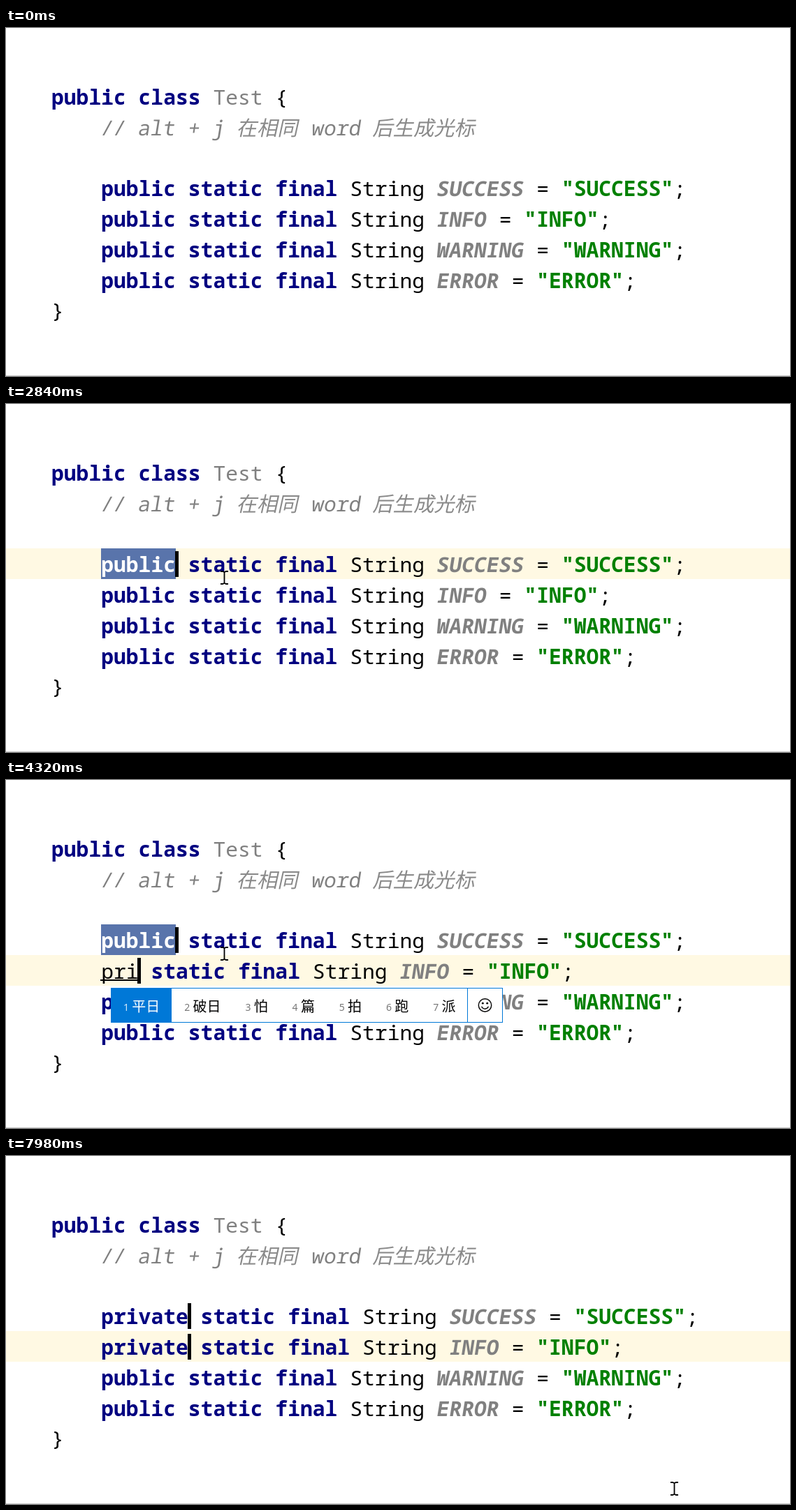
An HTML page with a canvas that plays this animation: 1122 px wide and 499 px high, repeating every 8000 ms.

```html
<!DOCTYPE html>
<html lang="zh">
<head>
<meta charset="utf-8">
<title>Multiple carets</title>
<style>
  html, body { margin: 0; width: 100%; height: 100%; overflow: hidden; background: #fff; }
  canvas { display: block; }
</style>
</head>
<body>
<canvas id="stage" width="1122" height="499"></canvas>
<script>
const ctx = document.getElementById('stage').getContext('2d');
const LOOP = 8000;
const SIZE = 29.67, CHAR = SIZE * 0.6, LEFT = 65, INDENT = LEFT + 4 * CHAR;
const HAN_SIZE = 29.3;
const MONO = '"Noto Sans Mono", "DejaVu Sans Mono", monospace';
const CJK = '"Noto Sans CJK SC", "Noto Sans CJK", sans-serif';
const THIN_CJK = '"Noto Sans CJK SC Light", ' + CJK;
const BLUE = '#0078d7';
const SLANT = 0.16;

// weight, colour, slant
const STYLES = {
  keyword: [600, '#000080', 0],
  plain: [400, '#000000', 0],
  gray: [400, '#808080', 0],
  comment: [400, '#808080', SLANT],
  field: [600, '#808080', SLANT],
  string: [600, '#008000', 0],
  selected: [600, '#ffffff', 0],
  composing: [400, '#ffffff', 0]
};

const FIELDS = ['SUCCESS', 'INFO', 'WARNING', 'ERROR'];

// Times at which the second line's word grows
const TYPING = [[2990, 'public'], [4000, 'p'], [4170, 'pr'], [4240, 'pri'],
  [4390, 'priv'], [4470, 'priva'], [4640, 'privat'], [4710, 'private']];

const CANDIDATES = [
  [4000, '怕 篇 拍 跑 派 平 盘'],
  [4170, '旁人 怕人 骗人 怕 篇 拍 跑'],
  [4320, '平日 破日 怕 篇 拍 跑 派'],
  [4470, 'private 平日 破日 怕 篇 拍 跑']
];

const CARET_ON = [[1380, 2380], [2840, 3850], [4000, 6350], [6900, 7360], [7910, LOOP]];
const POINTER_ON = [[70, 5030], [7130, LOOP]];

// start, end, steps, from, to, easing power
const GLIDES = [
  [70, 830, 11, [1105, 489], [168, 231], 2],
  [910, 910, 1, [152, 228], [152, 228], 1],
  [1140, 1210, 2, [174, 226], [196, 225], 1],
  [1530, 1750, 4, [225, 231], [312, 249], 1],
  [7130, 7360, 4, [420, 318], [906, 488], 1.4],
  [7910, 7980, 2, [934, 482], [956, 477], 1]
];

const within = (t, spans) => spans.some(([a, b]) => t >= a && t < b);
const latest = (t, list) => list.filter(item => t >= item[0]).pop();
const rowTop = row => Math.round(76 + 43.75 * row);
const baseline = row => rowTop(row) + 34;

function box(x, y, w, h, color) {
  ctx.fillStyle = color;
  ctx.fillRect(x, y, w, h);
}

// Slanted text leans about the middle of its letters
function write(text, x, y, font, color, slant = 0) {
  ctx.save();
  ctx.transform(1, 0, -slant, 1, x - slant * 11, y);
  ctx.font = font;
  ctx.fillStyle = color;
  ctx.fillText(text, 0, 0);
  ctx.restore();
}

function code(row, x, parts) {
  for (const [text, style] of parts) {
    const [weight, color, slant] = STYLES[style];
    write(text, x, baseline(row), `${weight} ${SIZE}px ${MONO}`, color, slant);
    x += text.length * CHAR;
  }
  return x;
}

function han(row, x, text) {
  write(text, x, baseline(row), `300 ${HAN_SIZE}px ${THIN_CJK}`, '#8a8a8a', 0.22);
  return x + text.length * HAN_SIZE;
}

function comment() {
  let x = code(1, INDENT, [['// alt + j ', 'comment']]);
  x = han(1, x, '在相同');
  x = code(1, x, [[' word ', 'comment']]);
  han(1, x, '后生成光标');
}

function declaration(row, word, style, name) {
  code(row, INDENT, [
    [word, style], [' static final ', 'keyword'], ['String ', 'plain'],
    [name, 'field'], [' = ', 'plain'], [`"${name}"`, 'string'], [';', 'plain']
  ]);
}

function select(row, length) {
  box(136, rowTop(row), Math.round(length * CHAR), 44, '#5974ab');
}

function caret(row, col) {
  box(Math.round(INDENT + col * CHAR - 1.2), rowTop(row) + 4, 5, 37, '#000');
}

function squiggle(x, y) {
  ctx.beginPath();
  for (let i = 0; i <= 6; i++) ctx.lineTo(x + i * 3, y + (i % 2 ? 0 : 4));
  ctx.strokeStyle = '#ff0000';
  ctx.lineWidth = 1.4;
  ctx.stroke();
}

function smiley(x, y) {
  ctx.strokeStyle = '#000';
  ctx.lineWidth = 1.4;
  ctx.beginPath();
  ctx.arc(x, y, 9.2, 0, Math.PI * 2);
  ctx.stroke();
  ctx.beginPath();
  ctx.arc(x, y, 5.2, 0.35, Math.PI - 0.35);
  ctx.stroke();
  for (const dx of [-3.2, 3.2]) {
    ctx.beginPath();
    ctx.arc(x + dx, y - 2.8, 1.4, 0, Math.PI * 2);
    ctx.fillStyle = '#000';
    ctx.fill();
  }
}

function popup(words) {
  const font = `400 20px "Noto Sans", ${CJK}`;
  const top = 298, height = 50;
  ctx.font = font;
  const widths = words.map(word => ctx.measureText(word).width + 47.2);
  const split = Math.round(150 + widths.reduce((a, b) => a + b, 0));
  box(150, top, split - 150 + 51, height, '#fff');
  box(150, top, Math.round(widths[0]), height, BLUE);
  let x = 150;
  words.forEach((word, i) => {
    write(i + 1, x + 18, 331, '400 14px "Noto Sans", sans-serif', i ? '#777' : '#d5e8f8');
    write(word, x + 30.3, 332, font, i ? '#000' : '#fff');
    x += widths[i];
  });
  ctx.strokeStyle = BLUE;
  ctx.lineWidth = 1;
  ctx.strokeRect(150.5, top + 0.5, split - 150 + 50, height - 1);
  box(split, top, 1, height, BLUE);
  smiley(split + 25.5, 323);
}

function pointer(t) {
  const [start, end, steps, from, to, power] = latest(t, GLIDES);
  const span = (end - start) / (steps - 1);
  const step = steps > 1 ? Math.min(steps - 1, Math.floor((t - start) / span + 0.05)) : 0;
  const p = steps > 1 ? 1 - (1 - step / (steps - 1)) ** power : 1;
  const [x, y] = from.map((v, i) => Math.round(v + (to[i] - v) * p));
  ctx.beginPath();
  for (const s of [-1, 1]) {
    ctx.moveTo(x - 5, y + s * 9);
    ctx.lineTo(x - 2, y + s * 9);
    ctx.lineTo(x + 0.5, y + s * 8);
    ctx.lineTo(x + 3, y + s * 9);
    ctx.lineTo(x + 6, y + s * 9);
  }
  ctx.moveTo(x + 0.5, y - 8);
  ctx.lineTo(x + 0.5, y + 8);
  ctx.strokeStyle = '#000';
  ctx.lineWidth = 1.8;
  ctx.stroke();
}

function draw(t) {
  const committed = t >= 5030;
  const picked = t >= 1460 && !committed;
  const typed = t >= 2990 ? latest(t, TYPING)[1] : 'public';
  const composing = t >= 4000 && !committed;
  const secondSelected = t >= 2990 && t < 4170;

  box(0, 0, 1122, 499, '#fff');
  if (t >= 1380) box(0, rowTop(t < 2990 ? 3 : 4), 1122, 44, '#fff9e3');
  if (picked) select(3, 6);
  if (secondSelected) select(4, typed.length);

  code(0, LEFT, [['public class ', 'keyword'], ['Test', 'gray'], [' {', 'plain']]);
  comment();

  let style = typed === 'public' || typed === 'private' ? 'keyword' : 'plain';
  if (secondSelected) style = composing ? 'composing' : 'selected';
  const words = [committed ? 'private' : 'public', typed, 'public', 'public'];
  const styles = [picked ? 'selected' : 'keyword', style, 'keyword', 'keyword'];
  FIELDS.forEach((name, i) => declaration(3 + i, words[i], styles[i], name));
  code(7, LEFT, [['}', 'plain']]);
  box(0, 498, 1122, 1, '#cdcdcd');

  if (composing) box(135, 286, Math.round(typed.length * CHAR) + 1, 2, '#000');
  if (t >= 4710 && t < 5430) squiggle(261, 288);
  if (within(t, CARET_ON)) {
    caret(3, t < 1460 ? 3 : committed ? 7 : 6);
    if (t >= 2990) caret(4, typed.length);
  }
  if (composing) popup(latest(t, CANDIDATES)[1].split(' '));
  if (within(t, POINTER_ON)) pointer(t);
}

const began = performance.now();
function tick() {
  draw((performance.now() - began) % LOOP);
  requestAnimationFrame(tick);
}
draw(0);
requestAnimationFrame(tick);
</script>
</body>
</html>
```
